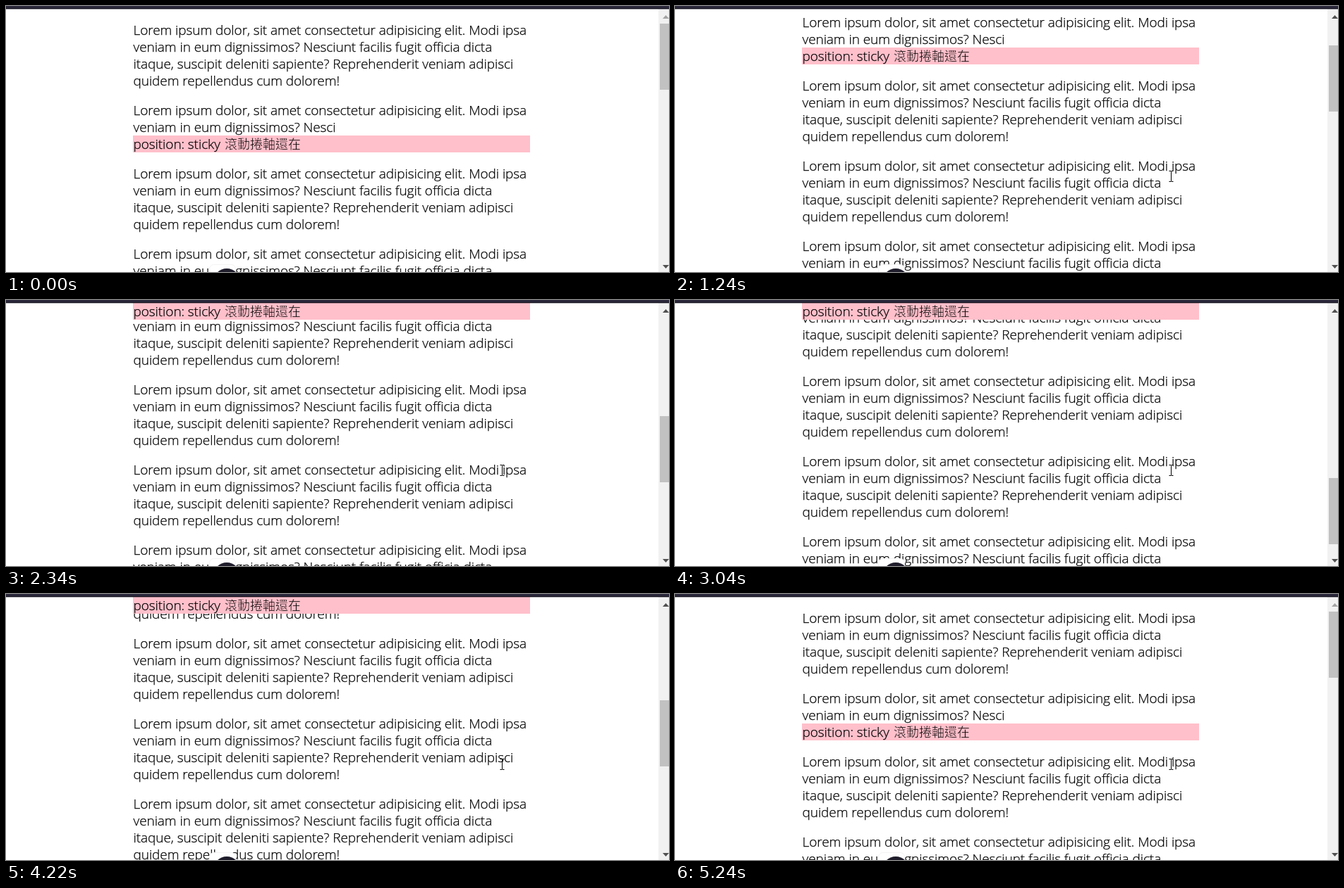
Animation, 940 px wide and 378 px high, one loop 5790 ms. Source, as an HTML page:

```html
<!DOCTYPE html>
<html lang="en">
<head>
<meta charset="utf-8">
<title>Sticky position while scrolling</title>
<style>
  html, body { margin: 0; width: 100%; height: 100%; overflow: hidden; background: #fff; }
  svg { display: block; width: 940px; height: 378px; }
  text {
    font: 300 19px "Open Sans", "Noto Sans", sans-serif;
    letter-spacing: -0.07px; white-space: pre;
    fill: #000; stroke: #000; stroke-width: 0.25px;
  }
  /* A thin stroke in the background colour lightens the strokes. */
  text.cjk {
    font: 300 18px "Noto Sans CJK TC", "Noto Sans CJK", sans-serif;
    letter-spacing: 0; stroke: #ffc0cb; stroke-width: 0.45px;
  }
</style>
</head>
<body>
<svg viewBox="0 0 940 378" xmlns="http://www.w3.org/2000/svg">
  <rect width="940" height="378" fill="#fff"/>
  <g id="page"></g>
  <g id="sticky">
    <rect x="180" width="563" height="24" fill="#ffc0cb"/>
    <text x="180.5" y="19">position: sticky</text>
    <text class="cjk" x="310" y="19" lang="zh-Hant">滾動捲軸還在</text>
  </g>

  <rect x="925" y="4" width="15" height="374" fill="#f1f1f1"/>
  <rect id="thumb" x="927" width="13" height="94" fill="#c1c1c1"/>
  <path id="up" d="M931 18h9l-4.5 -5z"/>
  <path id="down" d="M931 368h9l-4.5 5z"/>

  <rect x="288.5" y="367.5" width="37" height="30" rx="6" fill="#fff" stroke="#f3f3f3"/>
  <circle cx="313" cy="392" r="19" fill="#1f1c2b"/>

  <rect width="940" height="4" fill="#2b283b"/>
  <rect y="3" width="940" height="1.4" fill="#12101c"/>

  <path id="cursor" d="M-3 -7.5h2.5l.5 .5l.5 -.5h2.5M0 -7V7M-3 7.5h2.5l.5 -.5l.5 .5h2.5"
        fill="none" stroke="#000"/>
</svg>
<script>
const LOOP = 5790;
const VIEW_TOP = 4, LINE = 24, GAP = 18, LEFT = 180;
const STICKY_TOP = 184, MAX_SCROLL = 976, THUMB_RATIO = 0.2476;

const LINES = [
  "Lorem ipsum dolor, sit amet consectetur adipisicing elit. Modi ipsa",
  "veniam in eum dignissimos? Nesciunt facilis fugit officia dicta",
  "itaque, suscipit deleniti sapiente? Reprehenderit veniam adipisci",
  "quidem repellendus cum dolorem!"
];
const SHORT = [LINES[0], "veniam in eum dignissimos? Nesci"];

const WHEEL = [
  { start: 1080, end: 1240, steps: 3, to: 125 },
  { start: 1550, end: 1710, steps: 3, to: 250 },
  { start: 1930, end: 2500, steps: 8, to: 626 },
  { start: 2650, end: 3200, steps: 8, to: MAX_SCROLL },
  { start: 3670, end: 4220, steps: 8, to: 510 },
  { start: 4310, end: 4540, steps: 4, to: 347 },
  { start: 4700, end: 5240, steps: 8, to: 0 }
];
const POINTER = { start: 530, end: 850, steps: 5 };

const $ = id => document.getElementById(id);
const [page, sticky, thumb, up, down, cursor] =
  ["page", "sticky", "thumb", "up", "down", "cursor"].map($);

const lerp = (a, b, u) => a + (b - a) * u;
const smooth = u => u * u * (3 - 2 * u);

function addParagraph(lines, top) {
  lines.forEach((line, i) => {
    const el = document.createElementNS(page.namespaceURI, "text");
    el.setAttribute("x", LEFT + 0.5);
    el.setAttribute("y", top + i * LINE + 19);
    el.textContent = line;
    page.append(el);
  });
  return top + lines.length * LINE;
}

function buildPage() {
  let y = addParagraph(LINES, VIEW_TOP + GAP) + GAP;
  y = addParagraph(SHORT, y) + LINE + GAP;
  for (let i = 0; i < 10; i++) y = addParagraph(LINES, y) + GAP;
}

// Eased progress in discrete steps; the first step is taken at `start`.
function progress({ start, end, steps }, t) {
  if (t < start) return 0;
  const done = 1 + Math.floor((t - start + 5) / (end - start) * (steps - 1));
  return smooth(Math.min(done / steps, 1));
}

const scrollAt = t =>
  Math.round(WHEEL.reduce((pos, move) => lerp(pos, move.to, progress(move, t)), 0));

const place = (el, x, y) => el.setAttribute("transform", `translate(${x} ${y})`);
const arrowColor = active => active ? "#505050" : "#a3a3a3";

function draw(t) {
  const s = scrollAt(t);
  place(page, 0, -s);
  place(sticky, 0, Math.max(VIEW_TOP, STICKY_TOP - s));
  thumb.setAttribute("y", Math.round(25 + s * THUMB_RATIO));
  up.setAttribute("fill", arrowColor(s > 0));
  down.setAttribute("fill", arrowColor(s < MAX_SCROLL));

  const u = progress(POINTER, t);
  cursor.setAttribute("visibility", u > 0 ? "visible" : "hidden");
  place(cursor, lerp(624, 703.5, u), lerp(14, 242, u));
}

function tick() {
  draw(performance.now() % LOOP);
  requestAnimationFrame(tick);
}

buildPage();
tick();
</script>
</body>
</html>
```
